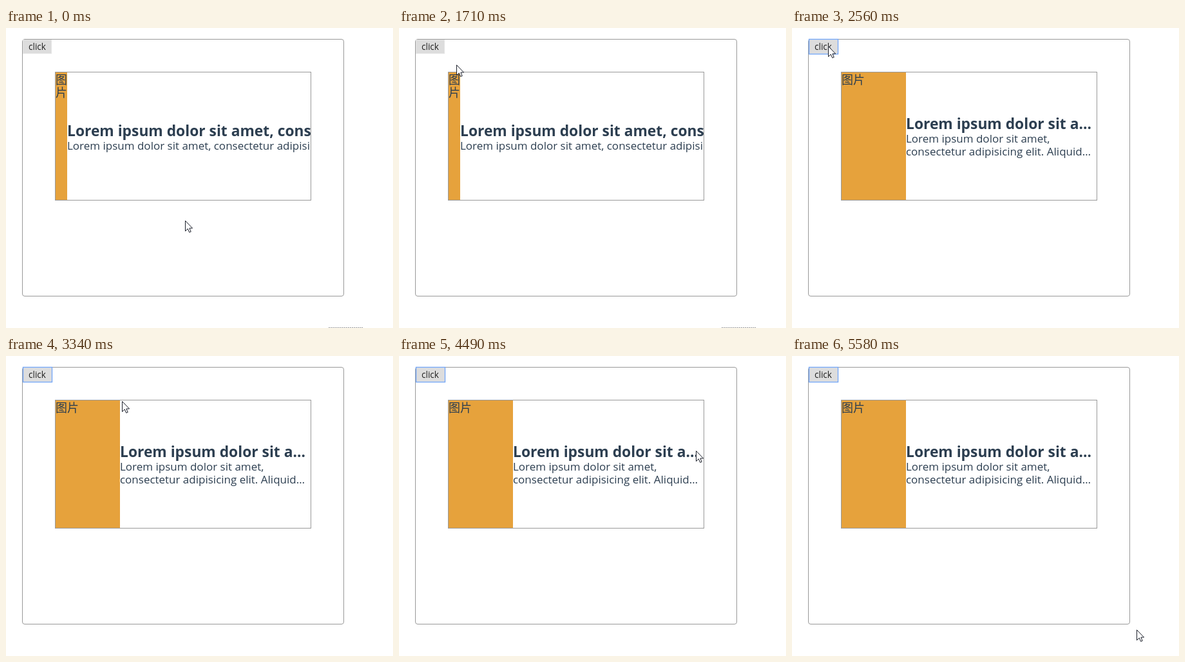
An HTML page that plays this animation: 601x466 px, repeating every 5660 ms.

```html
<!DOCTYPE html>
<html lang="en">
<head>
<meta charset="utf-8">
<title>Media card</title>
<style>
  html, body { margin: 0; width: 100%; height: 100%; overflow: hidden; background: #fff; }
  svg { display: block; }
  text { fill: #2c3e50; font: 17px "Open Sans", "Noto Sans", sans-serif; white-space: pre; }
  .title { font-size: 22.8px; font-weight: 700; }
  .cjk { font: 300 18px "Noto Sans CJK SC", "Noto Sans CJK", sans-serif; }
  .label { font-size: 13.6px; fill: #222; }
  .line { fill: none; stroke: #999; }
</style>
</head>
<body>
<svg width="601" height="466" viewBox="0 0 601 466">
  <clipPath id="inner"><rect x="77" y="69" width="396" height="198"/></clipPath>
  <rect class="line" x="25.5" y="17.5" width="499" height="399" rx="3.5"/>
  <rect x="26.5" y="18.5" width="44" height="21" fill="#ddd" stroke="#e4e4e4"/>
  <rect id="ring" x="26.5" y="17.5" width="45" height="23" fill="none" stroke="#76a7f5" stroke-width="1.4"/>
  <text class="label" x="35" y="34">click</text>
  <path id="dots" d="M501 465.5H554" stroke="#999" stroke-dasharray="2 1"/>

  <g id="narrow" clip-path="url(#inner)">
    <rect x="77" y="69" width="18" height="198" fill="#e6a23c"/>
    <text class="cjk" x="77" y="87">图</text>
    <text class="cjk" x="77" y="107">片</text>
    <text class="title" x="95" y="168">Lorem ipsum dolor sit amet, consectetur</text>
    <text x="95" y="189">Lorem ipsum dolor sit amet, consectetur adipisicing elit.</text>
  </g>
  <g id="wide" clip-path="url(#inner)">
    <rect x="77" y="69" width="100" height="198" fill="#e6a23c"/>
    <text class="cjk" x="77" y="87">图片</text>
    <text class="title" x="177" y="157">Lorem ipsum dolor sit a…</text>
    <text x="177" y="178">Lorem ipsum dolor sit amet,</text>
    <text x="177" y="198">consectetur adipisicing elit. Aliquid…</text>
  </g>
  <rect class="line" x="76.5" y="68.5" width="397" height="199"/>
  <path id="cursor" d="M.5 .5V16.5L4.3 12.9L6.7 18.4L9.2 17.4L6.9 12H11.6Z" fill="#fff" stroke="#1b1f2a" stroke-linejoin="round"/>
</svg>
<script>
  const LOOP = 5660, STEP = 77, PRESS = 2400, REFLOW = 2560, RETURN = 2873;
  const el = id => document.getElementById(id);
  const show = (id, on) => { el(id).style.display = on ? "" : "none"; };

  // Turning points of the pointer: [step, x, y].
  const approach = [
    [0, 278, 299], [4, 53, 190], [6, 125, 131], [10, 310, 210], [13, 68, 125],
    [15, 150, 89], [18, 215, 200], [22, 89, 57], [26, 56, 28]
  ];
  const tour = [
    [0, 56, 28], [3, 150, 95], [5, 150, 95], [6, 180, 70], [9, 85, 191], [12, 123, 18],
    [16, 215, 264], [20, 381, 130], [21, 461, 147], [23, 470, 224], [25, 372, 172],
    [28, 441, 110], [31, 552, 255], [35, 535, 425]
  ];

  // Smooth curve through the keys, at rest at both ends.
  function along(keys, step) {
    const last = keys.length - 1;
    const s = Math.min(step, keys[last][0]);
    const i = Math.min(last, keys.findIndex(k => k[0] >= s) || 1);
    const a = keys[i - 1], b = keys[i], span = b[0] - a[0], u = (s - a[0]) / span;
    const slope = (j, c) => j === 0 || j === last ? 0
      : (keys[j + 1][c] - keys[j - 1][c]) / (keys[j + 1][0] - keys[j - 1][0]);
    const ease = u * u * (3 - 2 * u);
    return [1, 2].map(c => Math.round(
      a[c] + (b[c] - a[c]) * ease
      + span * u * (1 - u) * ((1 - u) * slope(i - 1, c) - u * slope(i, c))));
  }

  function draw(t) {
    const [keys, from] = t < RETURN ? [approach, 0] : [tour, RETURN];
    const at = along(keys, Math.floor((t - from) / STEP));
    el("cursor").setAttribute("transform", `translate(${at})`);
    show("ring", t >= PRESS);
    show("dots", t < PRESS);
    show("narrow", t < REFLOW);
    show("wide", t >= REFLOW);
  }

  const start = performance.now();
  function tick() {
    draw((performance.now() - start) % LOOP);
    requestAnimationFrame(tick);
  }
  draw(0);
  requestAnimationFrame(tick);
</script>
</body>
</html>
```
